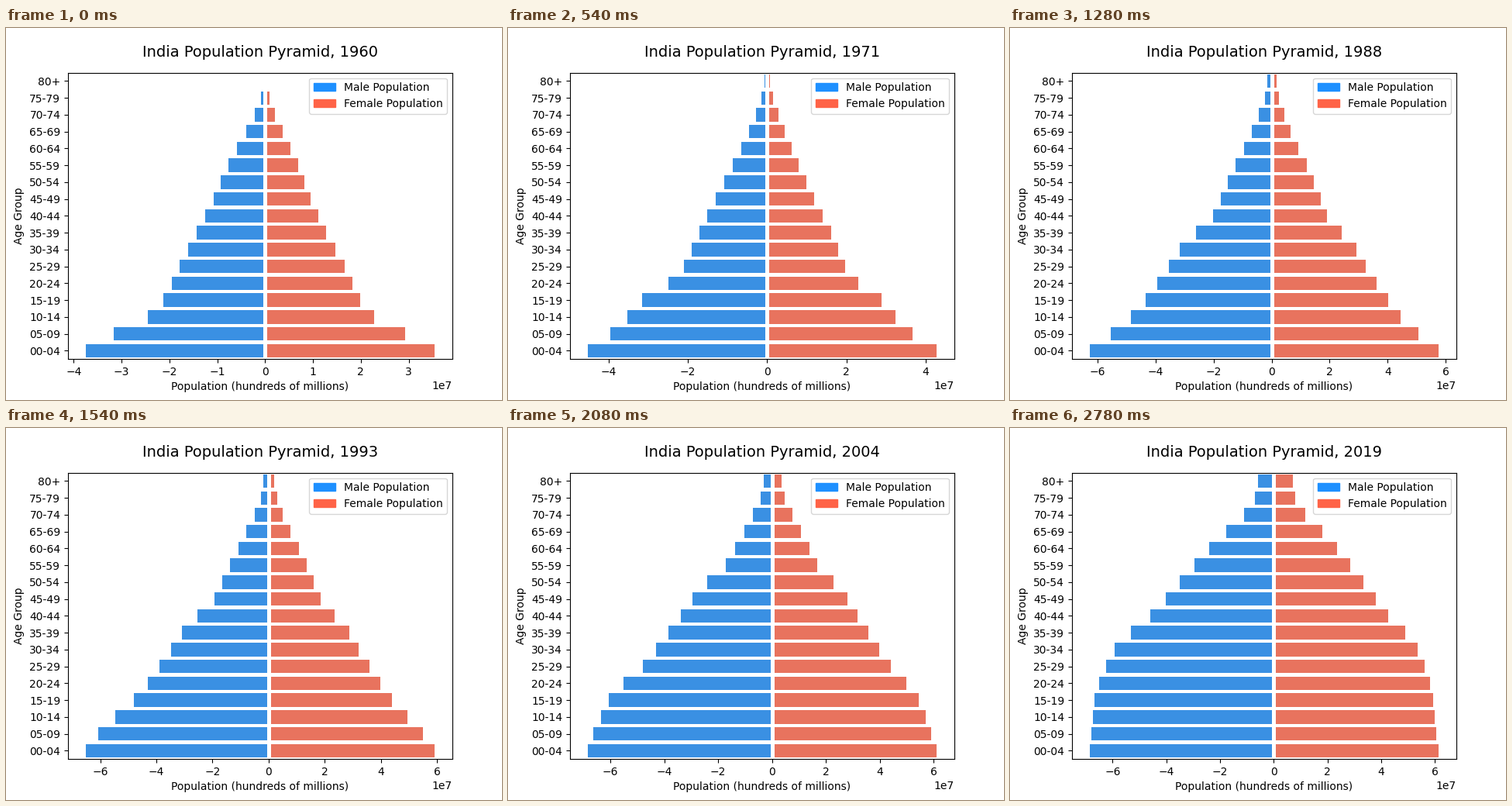
Recreate the animation shown at these times as a matplotlib script. Size 640 px wide and 480 px high, loop 2.88 s.

```python
import matplotlib.pyplot as plt
import numpy as np
from matplotlib.animation import FuncAnimation
from matplotlib.colors import to_rgb
from matplotlib.patches import Patch

plt.rcParams["font.family"] = "DejaVu Sans"

FIRST, LAST = 1960, 2019
TICK = 20  # ms per animation step
BLUE, RED = "dodgerblue", "tomato"

AGES = [f"{a:02d}-{a + 4:02d}" for a in range(0, 80, 5)] + ["80+"]
G = np.arange(len(AGES))

# (birth year, boys in millions), (birth year, girls per boy),
# (year, surplus of infants that will not grow up)
BOYS = [(1885, 15.2), (1908, 14.0), (1915, 14.3), (1924, 16.1), (1934, 18.7),
        (1944, 21.4), (1949, 23.3), (1956, 32.3), (1964, 37.5), (1974, 45.0),
        (1979, 49.6), (1984, 56.2), (1989, 61.4), (1994, 64.0), (1999, 66.2),
        (2004, 67.6), (2019, 68.0)]
GIRL_RATIO = [(1885, 0.84), (1914, 0.855), (1924, 0.87), (1934, 0.92),
              (1946, 0.93), (1955, 0.905), (1973, 0.914), (1990, 0.893),
              (2004, 0.883), (2019, 0.888)]
INFANTS = [(1960, 0.086), (1970, 0.07), (1980, 0.07), (1998, 0.02), (2019, 0.013)]


def curve(x, points):
    return np.interp(x, *zip(*points))


def people(year, female=False):
    """Population by age group: births thinned by Gompertz mortality."""
    born = year - 5 * G
    size = curve(born, BOYS)
    risk = 0.0145 * np.exp(-0.016 * (born - 1924))
    surplus = curve(year, INFANTS)
    if female:
        size = size * curve(born, GIRL_RATIO)
        risk = risk - 0.0019
        surplus *= 1.5
    alive = np.exp(-risk * np.exp(0.06 * (5 * G + 2.5)))
    count = size * alive * (1 + surplus * 0.42 ** G)
    count[-1] *= 1.45  # the open group also holds everyone older
    return count * 1e6


def muted(color, keep=0.75):
    """Lower the HLS saturation of a colour."""
    rgb = np.array(to_rgb(color))
    mid = (rgb.max() + rgb.min()) / 2
    return mid + (rgb - mid) * keep


# Every third year is held longer, and so is the last one
years = []
for i, year in enumerate(range(FIRST, LAST + 1)):
    hold = 100 if i % 3 == 1 or year == LAST else 20
    years += [year] * (hold // TICK)

fig, ax = plt.subplots(figsize=(6.4, 4.8), dpi=100)
men_bars = ax.barh(G, -people(FIRST), color=muted(BLUE))
women_bars = ax.barh(G, people(FIRST, female=True), color=muted(RED))
ax.axvline(0, color="white", lw=3.6)
ax.set_ylim(-0.5, len(AGES) - 0.5)
ax.set_yticks(G, AGES)
ax.set_xlabel("Population (hundreds of millions)")
ax.set_ylabel("Age Group")
title = ax.set_title("", fontsize=14, pad=15)
ax.legend(handles=[Patch(color=BLUE, label="Male Population"),
                   Patch(color=RED, label="Female Population")],
          loc="upper right")


def update(step):
    year = years[step]
    men, women = people(year), people(year, female=True)
    for bar, n in zip(men_bars, men):
        bar.set_width(-n)
    for bar, n in zip(women_bars, women):
        bar.set_width(n)
    left, right = men.max(), women.max()
    margin = 0.05 * (left + right)
    ax.set_xlim(-left - margin, right + margin)
    title.set_text(f"India Population Pyramid, {year}")


anim = FuncAnimation(fig, update, frames=len(years), init_func=lambda: update(0),
                     interval=TICK, repeat=True, repeat_delay=0)
plt.show()
```
